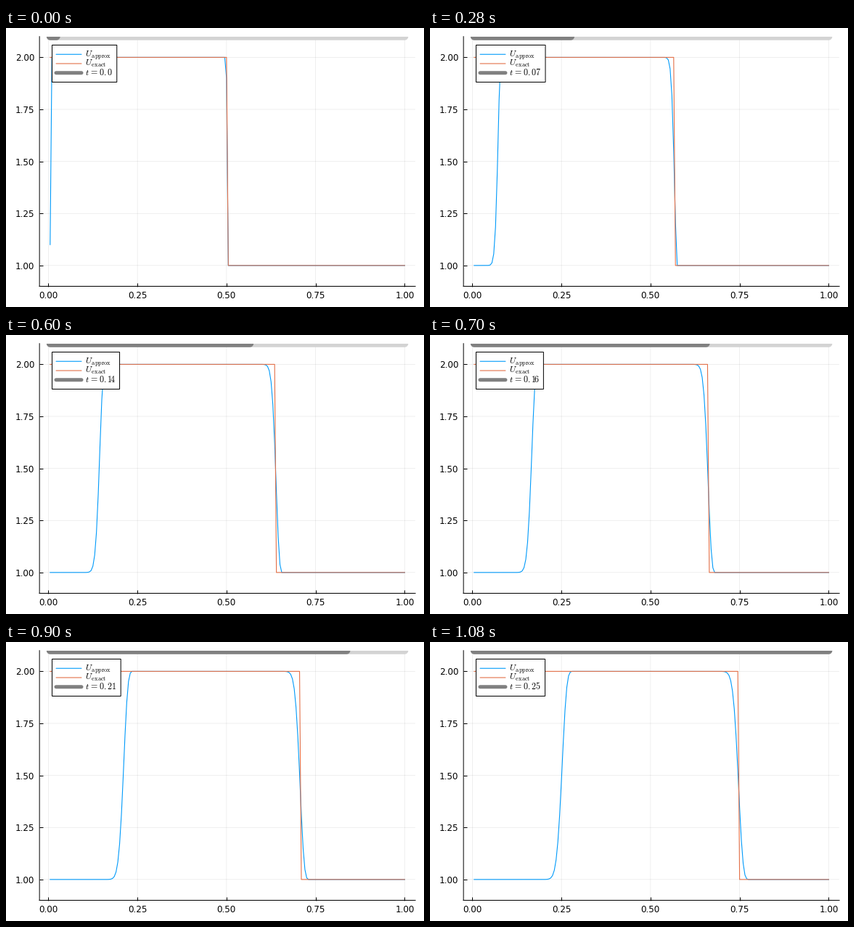
These frames come from a looping animation (576x384 px, 1100 ms). A matplotlib script:

```python
import numpy as np
import matplotlib.pyplot as plt
from matplotlib.animation import FuncAnimation
from matplotlib.patches import Rectangle

W, H, DPI = 576, 384, 100
PX = 72 / DPI  # one pixel in points
BLUE, RED, GRAY, LIGHT = "#009afa", "#e36f47", "#808080", "#d3d3d3"
STEPS, CELLS, CFL = 55, 200, 0.9

plt.rcParams.update({"font.family": "DejaVu Sans", "mathtext.fontset": "cm"})

dx = 1 / CELLS
dt = CFL * dx
x = dx * np.arange(1, CELLS + 1)


def upwind(n):
    """Advected pulse after n first-order upwind steps, inflow value 1."""
    u = np.where(np.arange(1, CELLS + 1) < CELLS // 2, 2.0, 1.0)
    for _ in range(n):
        u = u - CFL * (u - np.concatenate(([1.0], u[:-1])))
    return u


def exact(t):
    return np.where(x <= 0.5 + t + 1e-9, 2.0, 1.0)


def time_label(t):
    whole, digits = str(float(np.round(t, 2))).split(".")
    if digits[0] == "1":
        digits = r"\hspace{-0.22}".join(digits)  # tight after a narrow 1
    return rf"$t\hspace{{0.1}}=\hspace{{0.1}}{whole}.\hspace{{-0.08}}{digits}$"


fig = plt.figure(figsize=(W / DPI, H / DPI), dpi=DPI, facecolor="white")

left, right, top, bottom = 46.15, 564.05, 11.75, 355.5
ax = fig.add_axes([left / W, 1 - bottom / H, (right - left) / W, (bottom - top) / H])
margin = 0.03 * (x[-1] - x[0])
ax.set_xlim(x[0] - margin, x[-1] + margin)
ax.set_ylim(0.9, 2.1)
ax.set_xticks(np.linspace(0, 1, 5), [f"{v:.2f}" for v in np.linspace(0, 1, 5)])
ax.set_yticks(np.linspace(1, 2, 5), [f"{v:.2f}" for v in np.linspace(1, 2, 5)])
ax.tick_params(direction="in", length=5 * PX, width=PX, pad=7 * PX, labelsize=12 * PX)
ax.tick_params(axis="x", pad=6 * PX)
ax.grid(color="black", alpha=0.1, lw=0.6 * PX, snap=False)
ax.set_axisbelow(True)
for side in ("top", "right"):
    ax.spines[side].set_visible(False)
for side in ("left", "bottom"):
    ax.spines[side].set(linewidth=PX, snap=False)

approx_line, = ax.plot(x, upwind(0), color=BLUE, lw=1.1 * PX, snap=False)
exact_line, = ax.plot(x, exact(0), color=RED, lw=1.1 * PX, snap=False)
bar_style = dict(lw=10 * PX, solid_capstyle="round", snap=False)
ax.plot([x[0], x[-1]], [2.1, 2.1], color=LIGHT, **bar_style)
bar, = ax.plot([], [], color=GRAY, **bar_style)

# Legend, laid out in pixels from the top left corner
key = fig.add_axes([0, 0, 1, 1])
key.set_xlim(0, W)
key.set_ylim(H, 0)
key.axis("off")
KEY_X, KEY_Y, KEY_H = 63.5, 23.5, 51
box = key.add_patch(Rectangle((KEY_X, KEY_Y), 88, KEY_H, fc="white", ec="black",
                              lw=PX, snap=False))


def entry(row, label, color, width):
    y = KEY_Y + row * KEY_H / 4
    key.plot([69, 104], [y, y], color=color, lw=width * PX,
             solid_capstyle="round", snap=False)
    return key.text(108.7, y + 3.2, label, size=12 * PX, va="baseline")


entry(1, r"$U_{\hspace{0.1}\mathrm{approx}}$", BLUE, 1.1)
entry(2, r"$U_{\hspace{0.1}\mathrm{exact}}$", RED, 1.1)
clock = entry(3, "", GRAY, 5)


def update(k):
    n = k + 1
    t = n * dt
    approx_line.set_ydata(upwind(n))
    exact_line.set_ydata(exact(t))
    bar.set_data([x[0], x[0] + (x[-1] - x[0]) * n / STEPS], [2.1, 2.1])
    clock.set_text(time_label(t))
    text_end = clock.get_window_extent(fig.canvas.get_renderer()).x1
    box.set_width(text_end + 6 - KEY_X)
    return approx_line, exact_line, bar, clock, box


anim = FuncAnimation(fig, update, frames=STEPS, interval=20, repeat=True, repeat_delay=0)
plt.show()
```
